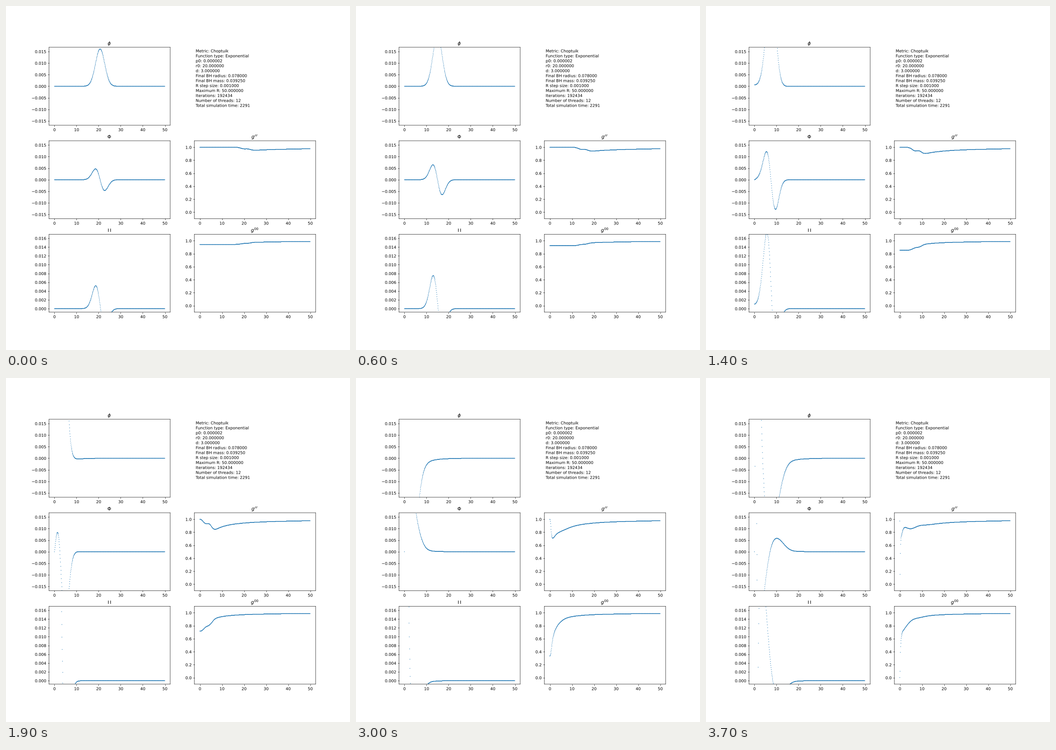
A matplotlib script for the animation above (3.8 s loop, 748 by 748 pixels).

```python
import math

import matplotlib.pyplot as plt
import numpy as np
from matplotlib import patheffects
from matplotlib.animation import FuncAnimation
from matplotlib.text import Text

np.seterr(all="ignore")

SIZE = 748
FRAMES = 38
SPLIT = 16                      # time at which the pulse nears the centre
R0, WIDTH = 20.0, 3.0
AMPLITUDES = (1.84e-6, 1.91e-6, 1.98e-6)
HORIZON = 0.074

# Staggered radial grid, fine at the centre; dr is the spacing per index.
FINE, STRETCH = 0.016, 0.009
count = math.ceil(math.asinh(50 * STRETCH / FINE) / STRETCH) + 1
index = np.arange(count) + 0.5
r = FINE / STRETCH * np.sinh(STRETCH * index)
dr = FINE * np.cosh(STRETCH * index)


def pad(f, parity):
    """Add three mirrored points at the centre and three at the edge."""
    return np.concatenate((parity * f[2::-1], f, f[-1:], f[-1:], f[-1:]))


def diff(f, parity):
    p = pad(f, parity)
    return (8 * (p[4:-2] - p[2:-4]) - (p[5:-1] - p[1:-5])) / (12 * dr)


def integrate(f, parity):
    p = pad(f, parity)
    parts = (13 * (p[2:-4] + p[3:-3]) - p[1:-5] - p[4:-2]) / 24
    parts[0] /= 2
    return np.cumsum(parts)


def smooth(f, parity):
    p = pad(f, parity)
    return (p[:-6] + p[6:] - 6 * (p[1:-5] + p[5:-1])
            + 15 * (p[2:-4] + p[4:-2]) - 20 * f) / 64


def metric(state):
    """Return g^rr and log(lapse / sqrt(g^rr)) from the constraints."""
    e = integrate(4 * np.pi * r * (state[0] ** 2 + state[1] ** 2) * dr, -1)
    e -= e[-1]
    grr = np.exp(-e) * integrate(np.exp(e) * dr, 1) / r
    return grr, e


def rates(state, speed=None):
    if speed is None:
        grr, e = metric(state)
        speed = grr * np.exp(e)
    flux, push = speed * state
    return np.array((diff(push, 1), diff(flux, -1) + 2 * flux / r))


def evolve(state, start, end, halt=False):
    """States at whole times, and the horizon radius if halted by collapse."""
    states = [state]
    for _ in range(start, end):
        left = 1.0
        while left > 1e-9:
            grr, e = metric(state)
            if halt and grr.min() < 0.2:
                i = grr.argmin()
                return states, r[i] * (1 - grr[i])
            speed = grr * np.exp(e)
            dt = min(left, 0.6 * (dr / speed).min())
            k1 = rates(state, speed)
            k2 = rates(state + dt / 2 * k1)
            k3 = rates(state + dt / 2 * k2)
            k4 = rates(state + dt * k3)
            state = state + dt / 6 * (k1 + 2 * k2 + 2 * k3 + k4)
            state += 0.25 * dt * speed / dr * np.array(
                (smooth(state[0], -1), smooth(state[1], 1)))
            left -= dt
        if not np.isfinite(state).all():
            state = states[-1]
        states.append(state)
    return states, 0.0


def initial(p):
    """Ingoing pulse: phi = p r^3 exp(-((r - r0) / d)^2)."""
    phi = p * r ** 3 * np.exp(-((r - R0) / WIDTH) ** 2)
    slope = phi * (3 / r - 2 * (r - R0) / WIDTH ** 2)
    return np.array((slope, slope + phi / r))


def blend(p, runs):
    """Quadratic interpolation in the amplitude."""
    weights = [math.prod((p - q) / (s - q) for q in AMPLITUDES if q != s)
               for s in AMPLITUDES]
    return np.tensordot(weights, runs, 1)


def solve():
    """Tune the amplitude to the wanted horizon, then return all states."""
    runs = np.array([evolve(initial(p), 0, SPLIT)[0] for p in AMPLITUDES])
    low, high = AMPLITUDES[0], AMPLITUDES[-1]
    for _ in range(10):
        mid = (low + high) / 2
        radius = evolve(blend(mid, runs[:, -1]), SPLIT, FRAMES - 1, True)[1]
        if radius > HORIZON:
            high = mid
        else:
            low = mid
    early = list(blend(high, runs))
    return early[:-1] + evolve(early[-1], SPLIT, FRAMES - 1)[0]


states = solve()
samples = np.arange(500) * 0.1

fig, axes = plt.subplots(3, 2, figsize=(12, 12), dpi=SIZE / 12)
axes[0, 1].axis("off")

panels = (
    (axes[0, 0], r"$\phi$", (-0.01683, 0.01683), 1),
    (axes[1, 0], r"$\Phi$", (-0.01683, 0.01683), -1),
    (axes[2, 0], r"$\Pi$", (-0.0008, 0.01691), 1),
    (axes[1, 1], "$g^{rr}$", (-0.1, 1.1), 1),
    (axes[2, 1], "$g^{00}$", (-0.1, 1.1), 1),
)
dots = []
for ax, title, limits, _ in panels:
    dots.append(ax.scatter([], [], s=2.6, facecolors="C0", edgecolors="none"))
    ax.set_title(title)
    ax.set_xlim(-2.495, 52.395)
    ax.set_ylim(*limits)
    for spine in ax.spines.values():
        spine.set_snap(False)

INFO = """Metric: Choptuik
Function type: Exponential
p0: 0.000002
r0: 20.000000
d: 3.000000
Final BH radius: 0.078000
Final BH mass: 0.039250
R step size: 0.001000
Maximum R: 50.000000
Iterations: 192434
Number of threads: 12
Total simulation time: 2291"""
for row, line in enumerate(INFO.split("\n")):
    fig.text(412.5 / SIZE, 1 - (100.8 + 10.78 * row) / SIZE, line)

# Draw text as outlines so that it is not rounded to whole pixels.
fig.canvas.draw()
for label in fig.findobj(Text):
    label.set_path_effects([patheffects.Normal()])


def snap(ax, y):
    """Round the points to a 1200-pixel raster."""
    scale = 1200 / SIZE
    pixels = ax.transData.transform(np.column_stack((samples, y)))
    return ax.transData.inverted().transform(
        np.floor(pixels * scale + 0.5) / scale)


def update(i):
    grr, e = metric(states[i])
    slope, momentum = states[i]
    phi = integrate(slope * dr, -1)
    curves = (phi - phi[-1], slope, momentum, grr, np.exp(e) * np.sqrt(grr))
    mirrored = np.concatenate((-r[:1], r))
    for (ax, _, _, parity), dot, f in zip(panels, dots, curves):
        values = np.concatenate((parity * f[:1], f))
        dot.set_offsets(snap(ax, np.interp(samples, mirrored, values)))
    return dots


anim = FuncAnimation(fig, update, frames=FRAMES, interval=100, repeat=True)
plt.show()
```
